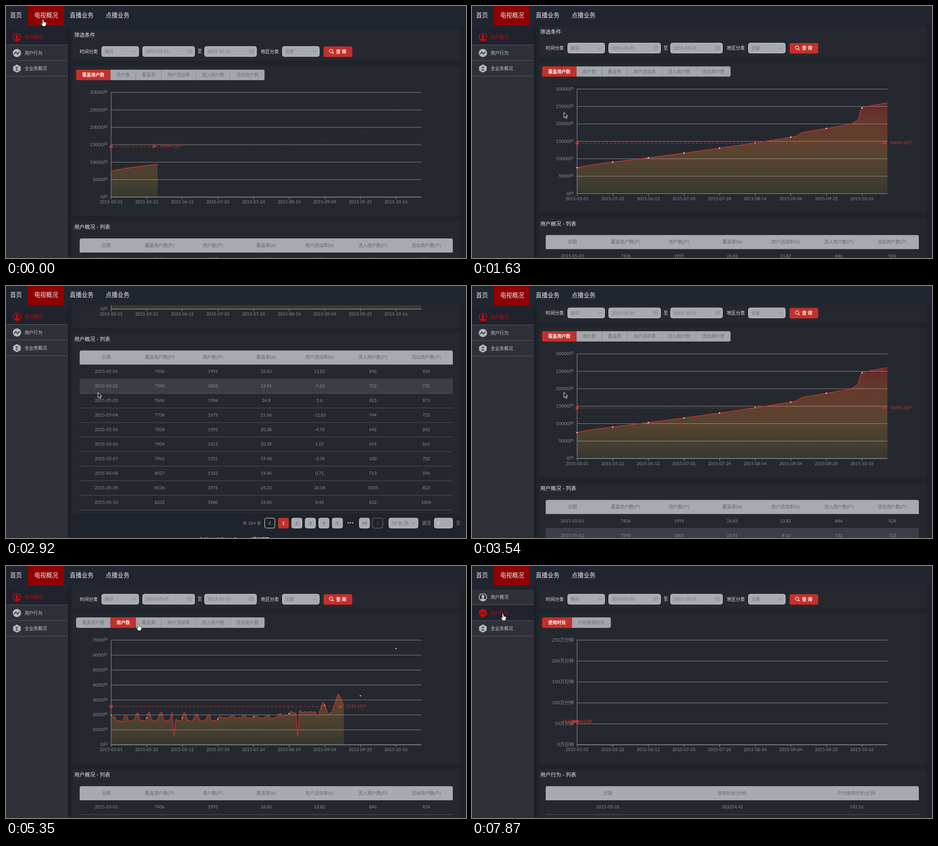
Write an HTML page that moves like this. It is 1011 by 554 pixels and loops after 8 s.

```html
<!DOCTYPE html>
<html lang="zh-CN">
<head>
<meta charset="utf-8">
<title>用户概况</title>
<style>
html, body { margin: 0; width: 100%; height: 100%; overflow: hidden; background: #1f232b; }
svg { display: block; width: 1011px; height: 554px; }
text { font-family: Lato, "Noto Sans CJK SC", "Noto Sans CJK", sans-serif; white-space: pre; }
</style>
</head>
<body>
<svg id="stage" viewBox="0 0 1011 554"></svg>
<script>
const LOOP = 8000;
const RED = '#c4302b', LINE = '#c23531', GREY = '#a7aaaf', DIM = '#8b8e94', INK = '#6d7075', PALE = '#e4e5e7';
const LEFT = 231, RIGHT = 913, TOP = 190, BASE = 420, DAYS = 184;

// The screen refreshes in even steps up to each of these moments: [until, steps]
const STEPS = [0];
for (const [until, n] of [[1180, 7], [1630, 1], [2920, 7], [3540, 3], [5350, 10], [5680, 2], [6130, 1],
  [6420, 1], [6890, 3], [7430, 3], [7870, 1]]) {
  const from = STEPS[STEPS.length - 1];
  for (let k = 1; k <= n; k++) STEPS.push(from + (until - from) * k / n);
}

const clamp = u => Math.min(1, Math.max(0, u));
const ease = (t, from, to) => {
  const u = clamp((t - from) / (to - from));
  return u * u * (3 - 2 * u);
};
const scrollAt = t => 369.3 * ease(t, 1520, 2820) - 342.3 * ease(t, 2930, 3624);

// Pointer moves: [from, to, x, y]
const MOVES = [[0, 1180, 202, 234], [3720, 4450, 257, 127], [4990, 5530, 303, 127], [6420, 6890, 83, 97], [6890, 7430, 68, 105]];
const pointerAt = t => MOVES.reduce(([x, y], [from, to, tx, ty]) => {
  const u = ease(t, from, to);
  return [x + (tx - x) * u, y + (ty - y) * u];
}, [81.5, 29.5]);

// Covered users, active users, inflow, outflow per day
const DAILY = `7436 1995 846 924
7540 1803 732 722
7646 1904 823 973
7734 1675 744 722
7828 1595 642 642
7904 1612 659 661
7961 1551 600 702
8027 1562 713 596
8136 1971 1005 823
8233 1980 832 1004`.split('\n').map(r => r.split(' ').map(Number));

const percent = v => String(+(100 * v).toFixed(2));
const ROWS = DAILY.map(([all, used, into, out], i) => {
  const before = i ? DAILY[i - 1][1] : 1752.8;
  return ['2015-05-' + String(i + 1).padStart(2, '0'), all, used, percent(used / all), percent(used / before - 1), into, out];
});

const rise = (i, at, width) => 1 / (1 + Math.exp((at - i) / width));
const cover = i => 7942 + 51.4 * i + .111 * i * i - 506 * Math.exp(-i / 8) +
  800 * rise(i, 131, .8) + 600 * rise(i, 163, .7) + 3600 * rise(i, 166.6, .45);

// Weekday level, with weekend bumps that fade in summer
const TREND = [[0, 1590], [61, 1590], [67, 1790], [96, 1770], [112, 2180], [120, 2200], [122, 1880], [125, 2870],
  [128, 2090], [130, 2140], [134, 3400], [137, 2740], [147, 3250], [159, 4400], [168, 6400], [183, 6500]];
const WEEK = [.35, 1, .9, .12, .05, 0, .05];
const users = i => {
  if (i < DAILY.length) return DAILY[i][1];
  if (i === 37 || i === 110) return 590;
  const k = Math.max(1, TREND.findIndex(p => p[0] >= i)), [a, u] = TREND[k - 1], [b, v] = TREND[k];
  const bump = i < 63 ? 330 + 250 * Math.sin(Math.PI * i / 63) : i < 110 ? 190 : 0;
  return u + (v - u) * (i - a) / (b - a) + bump * WEEK[i % 7] + 35 * Math.sin(i * 2.1);
};

const ticks = (n, step, unit) => Array.from({ length: n + 1 }, (_, k) => k * step + unit);
const USER_TABS = ['覆盖用户数', '用户数', '覆盖率', '用户流动率', '流入用户数', '流出用户数'];
const VIEWS = [
  { start: -150, max: 30000, mean: 14494.38, label: '14494.38户', ticks: ticks(6, 5000, '户'), value: cover, tabs: USER_TABS, tab: 0 },
  { start: 4600, max: 7000, mean: 2549.95, label: '2549.95户', ticks: ticks(7, 1000, '户'), value: users, tabs: USER_TABS, tab: 1 },
  { start: 6357, max: 30, mean: 17.24, label: '17.24%', ticks: ticks(6, 5, '%'), value: i => 100 * users(i) / cover(i), tabs: USER_TABS, tab: 2 },
  { start: 7870, max: 250, mean: 55.31, label: '553082.64分钟', ticks: ticks(5, 50, '万分钟'), tabs: ['使用时长', '户均使用时长'], tab: 0, usage: true }
];

const text = (x, y, s, size, fill, anchor = 'start', weight = 400) =>
  `<text x="${x}" y="${y + size * .36}" font-size="${size}" fill="${fill}" text-anchor="${anchor}" font-weight="${weight}">${s}</text>`;
const mid = (x, y, s, size, fill, weight) => text(x, y, s, size, fill, 'middle', weight);
const bold = (x, y, s, size) => text(x, y, s, size, PALE, 'start', 500);
const rect = (x, y, w, h, fill, r = 0, more = '') =>
  `<rect x="${x}" y="${y}" width="${w}" height="${h}" rx="${r}" fill="${fill}" ${more}/>`;
const path = (d, stroke, width = 1, fill = 'none', more = '') =>
  `<path d="${d}" stroke="${stroke}" stroke-width="${width}" fill="${fill}" ${more}/>`;
const shape = (d, fill) => path(d, 'none', 0, fill);
const circle = (x, y, r, fill, more = '') => `<circle cx="${x}" cy="${y}" r="${r}" fill="${fill}" ${more}/>`;
const move = (x, y, body) => `<g transform="translate(${x} ${y})">${body}</g>`;
const clip = (id, area, body) => `<clipPath id="${id}">${area}</clipPath><g clip-path="url(#${id})">${body}</g>`;
const field = (x, y, w, s = '') =>
  rect(x + .5, y + .5, w - 1, 22, GREY, 4, 'stroke="#d5d7da"') + text(x + 7, y + 11.5, s, 9.5, INK);
const chevron = (x, y) => path(`M${x - 3.5} ${y - 1.7}l3.5 3.5 3.5-3.5`, INK);

function filters() {
  const y = 88.5, c = 100;
  const select = (x, s) => field(x, y, 82, s) + chevron(x + 71, c);
  const date = (x, s) => field(x, y, 115, s) + move(x + 99, 96, path('M0 .5h9v7H0zM0 3h9M2.5-1v2M6.5-1v2M2.5 5.500h4', '#85888c', .9));
  return rect(146, 52, 852, 68, '#25292f') + bold(150, 64, '筛选条件', 11.5) +
    bold(162, c, '时间分类', 9.9) + select(210, '按日') + date(300, '2015-05-01') +
    bold(421, c, '至', 9.7) + date(436, '2015-10-31') + bold(560, c, '地区分类', 9.9) + select(607, '全部') +
    rect(698, 89, 63, 23, RED, 4) + circle(714.5, 99, 3.7, 'none', 'stroke="#fff" stroke-width="1.2"') +
    path('M717.300 101.800l3 3', '#fff', 1.3) + mid(736.5, c, '查 询', 10, '#fff', 700);
}

function tabs(view) {
  let x = 154, out = '';
  view.tabs.forEach((s, i) => {
    const w = s.length * 9.85 + 26.4, on = i === view.tab;
    out += rect(x, 140, w, 23, on ? RED : '#a3a6ab') + mid(x + w / 2, 151.5, s, 9.85, on ? '#fff' : INK, on ? 700 : 400);
    x += w;
  });
  return clip('bar', rect(154, 140, x - 154, 23, '#000', 4), out);
}

// Smooth curve through all days, flat at the turning points
function curve(ys, dx) {
  const slope = ys.map((y, i) => {
    const a = y - ys[i - 1], b = ys[i + 1] - y;
    return a * b > 0 ? (a + b) / 2 : 0;
  });
  return ys.map((y, i) => {
    const x = LEFT + i * dx;
    if (!i) return `M${x} ${y}`;
    return `C${x - dx * 2 / 3} ${ys[i - 1] + slope[i - 1] / 3} ${x - dx / 3} ${y - slope[i] / 3} ${x} ${y}`;
  }).join('');
}

function chart(view, t) {
  const part = clamp((t - view.start) / 1000);
  const dx = (RIGHT - LEFT) / (DAYS - 1), tip = LEFT + (RIGHT - LEFT) * part;
  const yOf = v => BASE - v / view.max * (BASE - TOP);
  const wipe = rect(LEFT - 1, TOP - 10, tip - LEFT + 1, 240, '#000');
  let out = rect(146, 132, 852, 329, '#25292f') + tabs(view), line = '';

  if (view.value) {
    const ys = Array.from({ length: DAYS }, (_, i) => yOf(view.value(i)));
    const d = curve(ys, dx), small = part < .3;
    out += clip('area', wipe, shape(d + `V${BASE}H${LEFT}Z`, 'url(#heat)'));
    line = clip('line', wipe, path(d, LINE, 1.6, 'none', 'stroke-linejoin="round"'));
    for (let i = 0; i < DAYS; i += 21)
      line += circle(LEFT + i * dx, ys[i], .5 + 1.2 * part, small ? LINE : '#fff', `stroke="${LINE}" stroke-width="${small ? 0 : .8}"`);
  }

  view.ticks.forEach((s, i, all) => {
    const y = BASE - i * (BASE - TOP) / (all.length - 1);
    out += path(`M${LEFT} ${y}H${RIGHT}`, 'rgba(200,202,206,.6)') + text(224, y - .5, s, 10.2, DIM, 'end');
  });
  out += path(`M${LEFT} ${TOP}V${BASE}H${RIGHT}`, '#96999d');
  for (let i = 0; i < DAYS; i += 21) {
    const x = LEFT + i * dx, day = new Date(Date.UTC(2015, 4, 1 + i));
    out += path(`M${x} ${BASE}v5`, '#96999d') + mid(x, 431, day.toISOString().slice(0, 10), 9.4, DIM);
  }

  const y = yOf(view.mean);
  return out + line + path(`M${LEFT} ${y}H${tip}`, LINE, 1, 'none', 'stroke-dasharray="5 4"') + circle(LEFT, y, 3.6, LINE) +
    shape(`M${tip} ${y}l-12.500-4.500 3.500 4.500-3.500 4.500z`, LINE) +
    text(part ? tip + 5 : LEFT, y - .8, view.label, 9.5, LINE, part ? 'start' : 'middle');
}

function table(usage, hover) {
  const head = usage ? ['日期', '使用时长(分钟)', '户均使用时长(分钟)']
    : ['日期', '覆盖用户数(户)', '用户数(户)', '覆盖率(%)', '用户流动率(%)', '流入用户数(户)', '流出用户数(户)'];
  const rows = usage ? [['2015-05-01', '383354.42', '192.16']] : ROWS;
  const w = 820 / head.length;
  const cells = (row, y, size, fill) => row.map((s, i) => mid(162 + w * (i + .5), y, s, size, fill)).join('');
  let out = rect(146, 474, 852, 396, '#25292f') + bold(150, 486, (usage ? '用户行为' : '用户概况') + ' - 列表', 11.5) +
    shape('M162 542v-27q0-4 4-4h812q4 0 4 4v27z', GREY) + cells(head, 526, 9.9, '#66696e');
  rows.forEach((row, k) => {
    const y = 541.5 + 32 * k;
    if (hover && k === 1) out += rect(162, y, 820, 32, '#3b3e46');
    out += cells(row, y + 15.5, 9.5, DIM) + path(`M162 ${y + 32}h820`, '#505359');
  });
  return out;
}

function pager() {
  const y = 879, c = 890.5;
  const page = (x, n) => field(x, y, 23.5) + mid(x + 11.7, c, n, 10, INK, 700);
  const arrow = (x, dir, color) => rect(x + .5, y + .5, 22.5, 22, 'none', 4, `stroke="${color}"`) +
    path(`M${x + 11.7 - 1.7 * dir} ${c - 3.5}l${3.5 * dir} 3.5 ${-3.5 * dir} 3.500`, color);
  return text(520, c, '共 184 条', 9.6, DIM) + arrow(568, -1, PALE) +
    rect(598, y, 23.5, 23, RED, 4) + mid(609.7, c, 1, 10, '#fff', 700) +
    [2, 3, 4, 5].map(n => page(568.1 + 29.7 * n, n)).join('') +
    [752, 757, 762].map(x => circle(x, 890, 1.6, '#b9bbbf')).join('') + page(776, 19) + arrow(805, 1, '#777a80') +
    field(841, y, 65, '10 条/页') + chevron(895, c) + text(915, c, '跳至', 9.7, DIM) +
    field(941, y, 41) + text(947, c, '1', 9.5, '#eee') + text(989, c, '页', 9.7, DIM) +
    mid(502, 925.5, '© 2016 All Rights Reserved 版权所有', 9.4, '#fff', 700);
}

function nav() {
  return rect(0, -2, 1011, 45, '#212530') + rect(48, -2, 79, 45, '#8f0000') +
    [['首页', 9], ['电视概况', 62], ['直播业务', 140], ['点播业务', 219]]
      .map(([s, x]) => text(x, 20, s, 13.1, '#eceded', 'start', 500)).join('');
}

const ICONS = [
  c => circle(0, 0, 8.3, 'none', `stroke="${c}" stroke-width="1.7"`) + `<ellipse cy="-1.800" rx="3" ry="3.800" fill="${c}"/>` +
    shape('M-5.800 5.500Q-4.500 3-1.500 2.500h3Q4.500 3 5.800 5.500 0 10-5.800 5.500z', c),
  c => circle(0, 0, 9, c) + path('M-6 2.500l3.500-4.500 4 4.500 4-5.500', '#2a2d35', 1.8),
  c => shape('M0-9l8.300 4.500v9L0 9l-8.300-4.500v-9z', c) + mid(0, 0, 'Σ', 11, '#2a2d35', 700)
];

function sidebar(current, px, py) {
  let out = rect(0, 43, 136, 520, '#2e3138') + rect(0, 43, 136, 9, '#20242c');
  ['用户概况', '用户行为', '全业务概况'].forEach((s, i) => {
    const top = 51.5 + 34.4 * i, y = top + 17.3, on = i === current;
    const over = px < 136 && Math.abs(py + 5 - y) < 17;
    if (on) out += rect(0, top, 136, 34, '#20232d');
    out += path(`M0 ${top + 34}H136`, '#575a60') + move(24, y, ICONS[i](on ? '#d0050a' : '#b4b7bb')) +
      text(41, y, s, 9.8, on ? '#c1080c' : over ? '#c58084' : '#c6c8cb');
  });
  return out + rect(136, 43, 4, 520, 'rgba(0,0,0,.12)');
}

function pointer(x, y) {
  const hand = x < 136 || y < 140;
  return move(x, y, hand
    ? path('M-1.400 1.400a1.400 1.400 0 0 1 2.800 0v4.500l1.200-.4 1.500.6 1.400.2 1.400 1v3.400l-1.400 2.700v1.600h-6l-3.400-5c-.7-1.200.7-2.200 1.600-1.300l.9 1z', '#111', .8, '#fff')
    : path('M0 0v11.500l2.700-2.500 2 4.600 2-.9-2-4.500h3.800z', '#fff', 1, '#111'));
}

const DEFS = `<defs><linearGradient id="heat" gradientUnits="userSpaceOnUse" x1="0" y1="215" x2="0" y2="${BASE}">` +
  [[0, '#602829'], [.2, '#66372b'], [.55, '#5a442f'], [.8, '#4a4030'], [1, '#37382f']]
    .map(([o, c]) => `<stop offset="${o}" stop-color="${c}"/>`).join('') + '</linearGradient></defs>';

function scene(t) {
  const scroll = scrollAt(t), view = VIEWS.filter(v => t >= v.start).pop(), [px, py] = pointerAt(t);
  return DEFS + rect(0, 0, 1011, 554, '#1f232b') +
    move(0, -scroll, filters() + chart(view, t) + table(view.usage, t > 2700 && t <= 3720) + pager()) +
    move(0, scroll > 368 ? -1 : 0, sidebar(view.usage ? 1 : 0, px, py) + nav()) + pointer(px, py);
}

const stage = document.getElementById('stage');
const begin = performance.now();
let shown = -1;
function tick() {
  const now = (performance.now() - begin) % LOOP;
  const t = STEPS.filter(s => s <= now + .01).pop();
  if (t !== shown) {
    shown = t;
    stage.innerHTML = scene(t);
  }
  requestAnimationFrame(tick);
}
tick();
</script>
</body>
</html>
```
